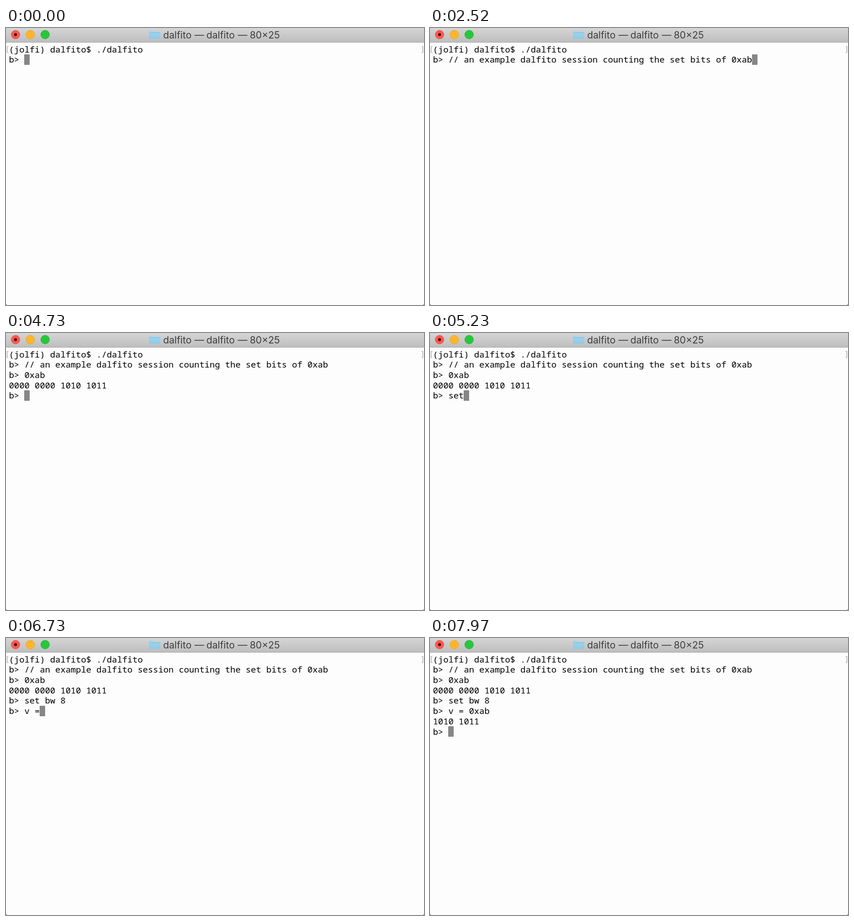
Animation, 919 px wide and 609 px high, one loop 8 s. Source, as an HTML page:

```html
<!DOCTYPE html>
<html lang="en">
<head>
<meta charset="utf-8">
<title>Terminal session</title>
<style>
  html, body { margin: 0; width: 100%; height: 100%; overflow: hidden; background: #fdfdfd; }
  svg { display: block; width: 100vw; height: 100vh; }
  .mono { font: 500 18.87px "Noto Sans Mono", monospace; fill: #000; white-space: pre; }
  .title { font: 21.2px Inter, sans-serif; fill: #3e3e3e; }
</style>
</head>
<body>
<svg viewBox="0 0 919 609" xmlns="http://www.w3.org/2000/svg">
  <defs>
    <linearGradient id="bar" x2="0" y2="1">
      <stop offset="0" stop-color="#d5d5d5"/>
      <stop offset="1" stop-color="#bebebe"/>
    </linearGradient>
    <linearGradient id="folder" x2="0" y2="1">
      <stop offset="0" stop-color="#a3d5ee"/>
      <stop offset="1" stop-color="#8fc9e6"/>
    </linearGradient>
  </defs>
  <rect width="919" height="609" fill="#fdfdfd"/>
  <rect width="919" height="31" fill="url(#bar)"/>
  <rect y="31" width="919" height="1" fill="#a3a3a3"/>

  <g stroke-width="1">
    <circle cx="21" cy="14.5" r="9.5" fill="#fc5850" stroke="#e8504a"/>
    <circle cx="53.5" cy="14.5" r="9.5" fill="#fdb52b" stroke="#e6a62a"/>
    <circle cx="86" cy="14.5" r="9.5" fill="#27c73c" stroke="#22b535"/>
  </g>
  <circle cx="21" cy="14.5" r="3.2" fill="#3c0604"/>

  <path d="M314.5 7.5q0-1.5 1.5-1.5h6.5l2.5 2h12.500q1.500 0 1.500 1.500v13q0 1.500-1.500 1.500h-21.500q-1.500 0-1.500-1.500z" fill="url(#folder)"/>
  <path d="M314.500 10.500H339" stroke="#7fbbda" stroke-width="1"/>

  <text class="title" y="22.5">
    <tspan x="345.500">dalfito</tspan><tspan x="425" text-anchor="middle">—</tspan><tspan x="440.500">dalfito</tspan><tspan x="520" text-anchor="middle">—</tspan><tspan x="602" text-anchor="end">80×25</tspan>
  </text>

  <path d="M5.500 40.500H2.500V54H5.500M913.500 40.500H916.500V54H913.500" fill="none" stroke="#9b9b9b" stroke-width="1.200"/>
  <rect id="cursor" height="23" fill="#868686"/>
  <g id="screen"></g>
  <path d="M0 606Q0 609 3 609H0zM919 606Q919 609 916 609H919z" fill="#222"/>
</svg>
<script>
const LOOP = 8000, LEFT = 6.5, TOP = 36, COL = 11.322, ROW = 22.7;
const BASE = 17.6;

const COMMENT = "// an example dalfito session counting the set bits of 0xab";

// Each entry: typed text, key times, time of Enter, printed result.
const session = [
  { text: COMMENT, keys: [...COMMENT].map((_, i) => 20 + i * 40.6), enter: 3230 },
  { text: "0xab", keys: [3790, 3910, 4130, 4350], enter: 4590, result: "0000 0000 1010 1011" },
  { text: "set bw 8", keys: [5000, 5120, 5220, 5320, 5420, 5520, 5620, 5720], enter: 6100 },
  { text: "v = 0xab", keys: [6270, 6430, 6670, 6830, 6990, 7090, 7210, 7330], enter: 7490, result: "1010 1011" },
  { text: "", keys: [], enter: Infinity }
];

const screen = document.getElementById("screen");
const cursor = document.getElementById("cursor");
const rows = Array.from({ length: 8 }, (_, i) => {
  const row = document.createElementNS("http://www.w3.org/2000/svg", "text");
  row.setAttribute("class", "mono");
  row.setAttribute("x", LEFT);
  row.setAttribute("y", TOP + i * ROW + BASE);
  screen.append(row);
  return row;
});

const columnX = col => Math.round(LEFT + col * COL);

function linesAt(t) {
  const lines = ["(jolfi) dalfito$ ./dalfito"];
  for (const { text, keys, enter, result } of session) {
    lines.push("b> " + text.slice(0, keys.filter(k => k <= t).length));
    if (t < enter) break;
    if (result) lines.push(result);
  }
  return lines;
}

function draw(t) {
  const lines = linesAt(t);
  rows.forEach((row, i) => {
    const line = lines[i] || "";
    if (row.textContent !== line) row.textContent = line;
  });
  const last = lines.length - 1;
  const col = lines[last].length;
  cursor.setAttribute("x", columnX(col));
  cursor.setAttribute("width", columnX(col + 1) - columnX(col));
  cursor.setAttribute("y", Math.floor(TOP + last * ROW));
}

const start = performance.now();
function tick() {
  draw((performance.now() - start) % LOOP);
  requestAnimationFrame(tick);
}
draw(0);
requestAnimationFrame(tick);
</script>
</body>
</html>
```
